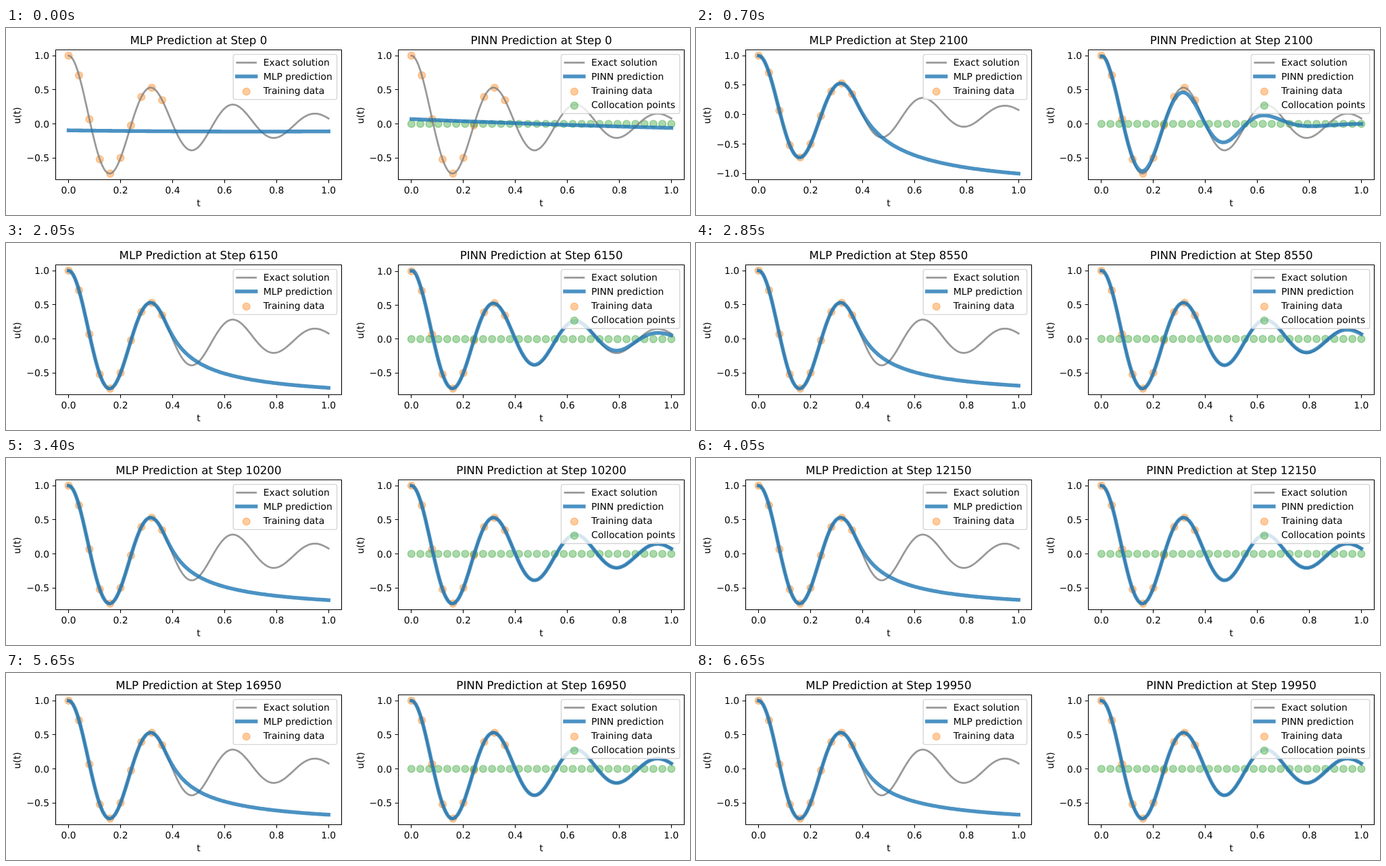
These frames come from a looping animation (1012x278 px, 6.7 s). An HTML page:

```html
<!DOCTYPE html>
<html lang="en">
<head>
<meta charset="utf-8">
<title>MLP and PINN training</title>
<style>
html, body { margin: 0; width: 100%; height: 100%; overflow: hidden; background: #fff; }
svg { display: block; width: 100%; height: 100%; font: 13.89px "DejaVu Sans", sans-serif; text-rendering: geometricPrecision; }
</style>
</head>
<body>
<svg id="stage" viewBox="0 0 1012 278"></svg>
<script>
const LOOP = 6700, FRAME = 50, STEPS_PER_FRAME = 150;
const TOP = 32.4, HEIGHT = 192.8, WIDTH = 423;
const BLUE = '#1f77b4', ORANGE = '#ff7f0e', GREEN = '#2ca02c', GREY = '#808080';
const DAMP = 2, OMEGA = Math.sqrt(396), PHASE = Math.atan(-DAMP / OMEGA);
const LAST_SAMPLE = 0.36;

const range = (n, fn) => Array.from({ length: n }, (_, i) => fn(i));
const mix = (a, b, k) => a + (b - a) * k;
const bell = x => Math.exp(-x * x);
const smooth = x => { x = Math.max(0, Math.min(1, x)); return x * x * (3 - 2 * x); };

const wave = (t, lag = 0) => Math.exp(-DAMP * t) * Math.cos(PHASE + OMEGA * t - lag) / Math.cos(PHASE);
const times = range(241, i => i / 240);
const exact = times.map(t => wave(t));
const samples = range(10, i => [i * 0.04, wave(i * 0.04)]);
const collocation = range(30, i => [i / 29, 0]);

// Fits the samples from left to right; beyond them it levels off at a settling plateau.
function mlp(step) {
  const plateau = -0.672 - 0.33 * Math.exp(-Math.max(0, step - 2100) / 2050);
  const bend = 0.107 + 0.108 * (-0.69 - plateau);
  const from = wave(LAST_SAMPLE), span = 1 - LAST_SAMPLE;
  const drop = (from - plateau) * (span + bend) / span;
  return times.map(t => {
    const s = t - LAST_SAMPLE;
    const fit = s < 0 ? wave(t) : from - drop * s / (s + bend) * (1 - 0.34 * Math.exp(-s / 0.03));
    const start = -0.095 - 0.05 * t + 0.035 * t * t;
    return mix(start, fit, smooth((step - 1500 * Math.min(t, 0.4)) / 700));
  });
}

// A front of full amplitude moves right while the late phase lag fades.
function pinn(step) {
  const front = 0.38 + 1.05e-4 * step - 0.5 * Math.exp(-step / 400);
  const lag = 3.5 * bell(step / 3700);
  const bump = 0.03 * bell((step - 4050) / 3000);
  return times.map(t => {
    const ratio = 1 / (1 + Math.exp((t - front) / 0.15));
    const late = lag * Math.pow(Math.max(0, 2 * t - 1), 2.5);
    const fit = ratio * wave(t, late) + bump * bell((t - 0.013) / 0.015);
    const start = 0.07 - 0.16 * t + 0.03 * t * t;
    return mix(start, fit, smooth(step / 900));
  });
}

const text = (x, y, s, anchor = 'start', more = '') =>
  `<text x="${x}" y="${y}" text-anchor="${anchor}" ${more}>${s}</text>`;
const line = (d, color, width, opacity = 1, cap = 'square') =>
  `<path d="${d}" fill="none" stroke="${color}" stroke-width="${width}" stroke-opacity="${opacity}" stroke-linecap="${cap}" stroke-linejoin="round"/>`;
const dot = (x, y, color) =>
  `<circle cx="${x.toFixed(2)}" cy="${y.toFixed(2)}" r="5.38" fill="${color}" stroke="${color}" stroke-width="1.39" fill-opacity=".4" stroke-opacity=".4"/>`;
const greyLine = d => line(d, GREY, 2.78, 0.8);
const blueLine = d => line(d, BLUE, 5.56, 0.8);

function legend(x, width, name, extra) {
  const handle = y => `M${x + 5.6} ${y}h27.8`;
  const labels = ['Exact solution', name + ' prediction', 'Training data'];
  if (extra) labels.push('Collocation points');
  return `<rect x="${x}" y="39.4" width="${width}" height="${extra ? 87.8 : 67}" rx="2.8" fill="#fff" fill-opacity=".8" stroke="#ccc" stroke-opacity=".8" stroke-width="1.39"/>`
    + greyLine(handle(51.5)) + blueLine(handle(72))
    + dot(x + 19.5, 94.5, ORANGE) + (extra ? dot(x + 19.5, 115.4, GREEN) : '')
    + labels.map((s, i) => text(x + 44.6, 56 + 21 * i, s)).join('');
}

function panel(left, name, pred, step, box, extra) {
  const all = exact.concat(pred);
  const low = Math.min(...all), high = Math.max(...all);
  const pad = (high - low) * 0.05;
  const px = t => left + WIDTH * (0.05 + t) / 1.1;
  const py = v => TOP + HEIGHT * (high + pad - v) / (high - low + 2 * pad);
  const curve = values => 'M' + values.map((v, i) => px(times[i]).toFixed(2) + ' ' + py(v).toFixed(2)).join('L');
  const dots = (points, color) => points.map(([t, v]) => dot(px(t), py(v), color)).join('');
  const snap = v => Math.floor(v) + 0.5;
  const mid = left + WIDTH / 2, edge = snap(left);

  let out = dots(samples, ORANGE) + (extra ? dots(collocation, GREEN) : '')
    + greyLine(curve(exact)) + blueLine(curve(pred));
  let ticks = '';
  for (let i = 0; i <= 5; i++) {
    ticks += `M${snap(px(i / 5))} 225.5v4.9`;
    out += text(px(i / 5), 246, (i / 5).toFixed(1), 'middle');
  }
  for (let i = Math.ceil((low - pad) * 2); i <= (high + pad) * 2; i++) {
    const y = py(i / 2);
    ticks += `M${edge} ${snap(y)}h-4.9`;
    out += text(left - 9.4, Math.round(y + 5.1), (i < 0 ? '\u2212' : '') + Math.abs(i / 2).toFixed(1), 'end');
  }
  return out + line(ticks, '#000', 1.11, 1, 'butt')
    + line(`M${edge} 32.5h${WIDTH}v193h-${WIDTH}z`, '#000', 1.11)
    + text(mid, 24, `${name} Prediction at Step ${step}`, 'middle', 'font-size="16.67"')
    + text(mid, 265, 't', 'middle')
    + text(0, 0, 'u(t)', 'middle', `transform="translate(${left - 52} 130) rotate(-90)"`)
    + legend(box[0], box[1], name, extra);
}

const stage = document.getElementById('stage');
let shown = -1;

function draw(ms) {
  const frame = Math.floor((ms % LOOP) / FRAME);
  if (frame !== shown) {
    shown = frame;
    const step = frame * STEPS_PER_FRAME;
    stage.innerHTML = panel(73.4, 'MLP', mlp(step), step, [336.2, 153.4], false)
      + panel(580.6, 'PINN', pinn(step), step, [821.4, 175.4], true);
  }
}

const begin = performance.now();
function tick() {
  draw(performance.now() - begin);
  requestAnimationFrame(tick);
}
tick();
</script>
</body>
</html>
```
